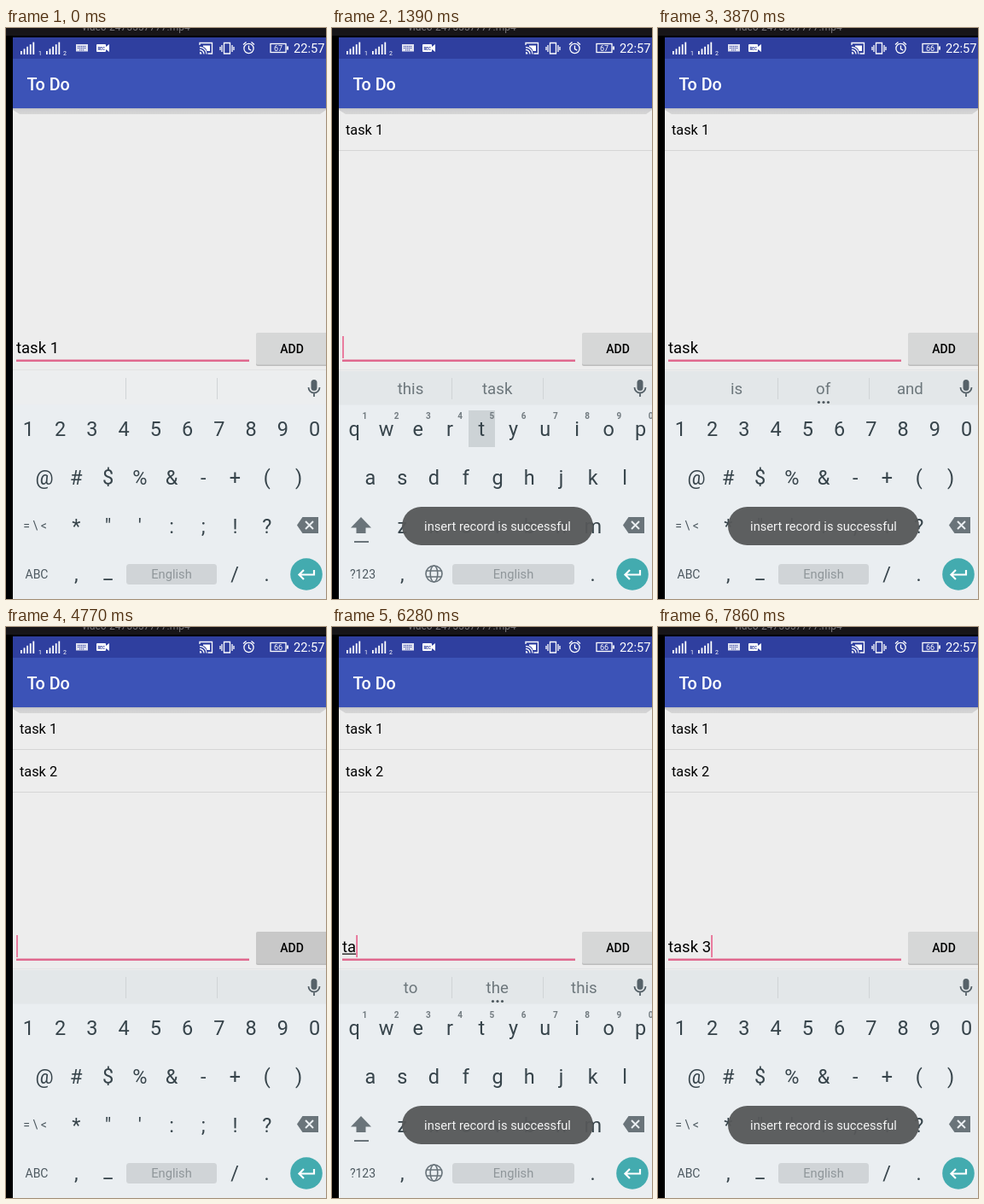
Write an HTML page that moves like this. It is 375 px wide and 669 px high and loops after 8000 ms.

```html
<!DOCTYPE html>
<html lang="en">
<head>
<meta charset="utf-8">
<title>To Do</title>
<style>
  html, body { margin: 0; width: 100%; height: 100%; overflow: hidden; background: #000; }
  svg { display: block; width: 375px; height: 669px; font-family: Roboto, sans-serif; }
  text { white-space: pre; }
  .mid { text-anchor: middle; }
  .key { font-size: 23.5px; fill: #37444b; }
  .mode { font-size: 14px; fill: #4d5960; }
  .hint { font-size: 10px; font-weight: 700; fill: #727b80; }
  .sug { font-size: 18.7px; fill: #6d777c; }
  .item { font-size: 16.3px; }
  .line { fill: none; stroke: #fff; stroke-width: 1.3; }
</style>
</head>
<body>
<svg viewBox="0 0 375 669">
  <defs>
    <linearGradient id="shade" x2="0" y2="1">
      <stop stop-color="#a9abb5"/><stop offset=".35" stop-color="#cfcfd1"/><stop offset="1" stop-color="#d6d6d6"/>
    </linearGradient>
  </defs>
  <rect width="375" height="9" fill="#171518"/>
  <text x="89" y="2.5" font-size="12" fill="#77757a">video-2475557777.mp4</text>
  <rect x="8" y="94" width="367" height="308" fill="#ededed"/>
  <path d="M8 93H375V96L368 101H16L8 96Z" fill="url(#shade)"/>
  <rect x="8" y="36" width="367" height="58" fill="#3c53b7"/>
  <rect x="8" y="11" width="367" height="25" fill="#2f3f9f"/>
  <text x="24.5" y="73" font-size="19.8" font-weight="500" fill="#fff">To Do</text>

  <g id="status" fill="#fff">
    <text x="38" y="32" font-size="7">1</text>
    <text x="67" y="32" font-size="7">2</text>
    <path d="M82 19h14v8.500h-14z" opacity=".85"/>
    <path d="M84 21.500h10M84 23.500h10M86 25.800h6" stroke="#2f3f9f" stroke-dasharray="1.200 .8"/>
    <path d="M107 19h9q1 0 1 1v2l4-3v9l-4-3v2q0 1-1 1h-9q-1 0-1-1v-7q0-1 1-1z"/>
    <text x="107.500" y="25.500" font-size="4.500" font-weight="700" style="fill:#2f3f9f">REC</text>
    <g class="line">
      <path d="M227 20v-2.500h14.500v12.500h-5M227 22.500a8 8 0 0 1 8 8M227 25.500a5 5 0 0 1 5 5"/>
      <path d="M255.500 17.500h7v12.500h-7zM253 20v8M265 20v8M251 22v4M267 22v4"/>
      <circle cx="284.500" cy="24" r="5.600"/>
      <path d="M284.500 20.500v4l2.800 1.600M278 19.500l3.500-3M291 19.500l-3.500-3"/>
      <rect x="310" y="18.500" width="18" height="10"/>
    </g>
    <path d="M231 20.500h8v6.500h-3.500q-1-4-4.500-5zM227 28a2.500 2.500 0 0 1 2.500 2.500H227zM329 21.500h2v4h-2z"/>
    <text id="battery" class="mid" x="319" y="27" font-size="9"></text>
    <text x="337" y="28.500" font-size="14.700">22:57</text>
  </g>

  <g id="list"></g>
  <rect x="12" y="388.500" width="273" height="2.400" fill="#e0648b"/>
  <text id="input" x="12" y="381" font-size="18.500"></text>
  <rect id="under" x="12" y="382.500" height="1.200"/>
  <rect id="cursor" y="361" width="1.600" height="26" fill="#e8608b"/>
  <rect x="293" y="358" width="84" height="38" rx="2" fill="#bcbcbc"/>
  <rect id="add" x="293" y="357" width="84" height="37.500" rx="2"/>
  <text class="mid" x="335" y="381" font-size="14" font-weight="500">ADD</text>

  <rect x="8" y="441" width="367" height="228" fill="#eaeef1"/>
  <rect id="strip" x="8" y="402" width="367" height="39.500"/>
  <path d="M8 400.500H375" stroke="#e1e3e4"/>
  <path d="M140.500 410v25M247.500 410v25" stroke="#d0d4d6"/>
  <g id="sugs"></g>
  <g id="dots" fill="#4d585e"><circle cx="188.500" cy="438.500" r="1.600"/><circle cx="194" cy="438.500" r="1.600"/><circle cx="199.500" cy="438.500" r="1.600"/></g>
  <rect x="357.500" y="412" width="7" height="13" rx="3.500" fill="#566269"/>
  <path d="M354.500 421a6.500 6.500 0 0 0 13 0M361 427.500v4.500" fill="none" stroke="#566269" stroke-width="1.800"/>

  <rect id="press" fill="#cdd3d6"/>
  <g id="abc"></g>
  <g id="sym"></g>
  <path d="M341 582.500l6.500-9.500h18.500v19h-18.500z" fill="#6a747a"/>
  <path d="M351 578l9 9M360 578l-9 9" stroke="#eaeef1" stroke-width="2"/>
  <circle cx="352" cy="640" r="18.800" fill="#43abaf"/>
  <path d="M361 635v5.500h-17M349 635l-5.500 5.500 5.500 5.500" fill="none" stroke="#fff" stroke-width="2.200"/>

  <g id="toast">
    <rect x="82" y="561" width="224" height="45" rx="22.500" fill="#565859" opacity=".95"/>
    <text class="mid" x="194" y="589" font-size="14.700" fill="#f4f4f4">insert record is successful</text>
  </g>
</svg>
<script>
const $ = id => document.getElementById(id);
const LOOP = 8000, STEP = 37.25;
const text = (cls, x, y, s) =>
  `<text class="${cls}" x="${x}" y="${y}">${s.replace('&', '&amp;').replace('<', '&lt;')}</text>`;
const row = (s, x, y, cls = 'mid key') =>
  [...s].map((c, i) => text(cls, x + i * STEP, y, c)).join('');
const space = w => `<rect x="141" y="628" width="${w}" height="24" rx="3.5" fill="#d0d4d7"/>`
  + `<text class="mid" x="${141 + w / 2}" y="645" font-size="14.7" fill="#8f969a">English</text>`;

for (const x of [17, 47])
  for (let i = 0; i < 5; i++)
    $('status').innerHTML += `<rect x="${x + i * 3.6}" y="${27 - i * 2.6}" width="1.8" height="${4 + i * 2.6}"/>`;

$('abc').innerHTML = row('qwertyuiop', 26.3, 478) + row('1234567890', 38.3, 457.5, 'mid hint')
  + row('asdfghjkl', 45, 535) + row('zxcvbnm', 82.3, 592)
  + '<path d="M34 573l12 12.500h-6.500v6.500h-11v-6.500H22zM26 601h17v2H26z" fill="#6a747a"/>'
  + text('mid mode', 36, 645, '?123') + text('mid key', 82.3, 648, ',') + text('mid key', 305.5, 648, '.')
  + space(143)
  + '<g fill="none" stroke="#68737a" stroke-width="1.600"><circle cx="119.500" cy="639.500" r="9.500"/>'
  + '<ellipse cx="119.500" cy="639.500" rx="4.300" ry="9.500"/><path d="M111 636h17M111 643h17"/></g>';

$('sym').innerHTML = row('1234567890', 26.3, 478) + row('@#$%&-+()', 45, 535) + row('*"\':;!?', 82.3, 592)
  + text('mid mode', 34, 588, '= \\ <') + text('mid mode', 36, 645, 'ABC')
  + text('mid key', 82.3, 648, ',') + text('mid key', 119.5, 645, '_')
  + text('mid key', 268, 648, '/') + text('mid key', 305.5, 648, '.') + space(106);

// Highlight boxes: x, y, width, height
const keys = {
  t: [160, 448, 31, 43], a: [30, 505, 31, 43], s: [67, 505, 31, 43], k: [290, 505, 31, 43],
  2: [49, 448, 31, 43], 3: [86, 448, 31, 43], mode: [11, 619, 50, 42], space: [138, 625, 149, 30]
};
const EMPTY = 'this task', T = 'to the this', TA = 'take task talk', TAS = 'taste task tasty',
  TASK = 'talk tasks tasked', NEXT = 'is of and';

// Each step changes only the listed fields.
const steps = [
  [0, { text: 'task 1', cursor: 0, items: 0, abc: 0, sugs: '', battery: 67, toast: 0, press: '', add: 0, plain: 1 }],
  [310, { add: 1 }],
  [430, { items: 1, text: '', cursor: 1 }],
  [580, { add: 0 }],
  [700, { abc: 1, sugs: EMPTY, plain: 0 }],
  [850, { toast: .5 }],
  [970, { toast: .95, cursor: 0 }],
  [1120, { toast: 1 }],
  [1270, { cursor: 1 }],
  [1390, { press: 't' }],
  [1510, { text: 't', battery: 66 }],
  [1630, { press: '', sugs: T }],
  [1780, { press: 'a' }],
  [1900, { text: 'ta' }],
  [2020, { press: '', sugs: TA }],
  [2170, { press: 's' }],
  [2290, { text: 'tas' }],
  [2410, { press: '', sugs: TAS }],
  [2570, { text: 'task', press: 'k' }],
  [2720, { press: '', sugs: TASK }],
  [2840, { press: 'space' }],
  [2960, { text: 'task ', sugs: NEXT }],
  [3080, { press: '' }],
  [3200, { press: 'mode' }],
  [3320, { press: '', abc: 0 }],
  [3870, { cursor: 0 }],
  [3990, { press: '2', cursor: 1 }],
  [4110, { text: 'task 2', sugs: '' }],
  [4260, { press: '', toast: .7 }],
  [4390, { toast: .2 }],
  [4500, { toast: 0 }],
  [4650, { items: 2, text: '', add: 1 }],
  [4930, { add: 0, abc: 1, sugs: EMPTY }],
  [5080, { toast: .5 }],
  [5200, { toast: 1, cursor: 0 }],
  [5480, { cursor: 1 }],
  [6010, { press: 't' }],
  [6130, { press: '', text: 't' }],
  [6280, { text: 'ta', sugs: T }],
  [6400, { sugs: TA }],
  [6560, { text: 'tas' }],
  [6680, { sugs: TAS }],
  [6830, { text: 'task' }],
  [6950, { sugs: TASK }],
  [7070, { press: 'space', text: 'task ' }],
  [7190, { press: '', sugs: NEXT }],
  [7310, { press: 'mode' }],
  [7430, { press: '', abc: 0 }],
  [7590, { cursor: 0 }],
  [7740, { press: '3', cursor: 1 }],
  [7860, { press: '', text: 'task 3', sugs: '' }]
];

const set = (id, attrs) => { for (const k in attrs) $(id).setAttribute(k, attrs[k]); };

function draw(s) {
  $('battery').textContent = s.battery;
  $('input').textContent = s.text;
  const width = s.text ? $('input').getComputedTextLength() : 0;
  set('cursor', { x: 12.2 + width, opacity: s.cursor });
  set('under', { width: s.text.includes(' ') ? 0 : width });
  set('add', { fill: s.add ? '#c8c8c8' : '#d6d7d7' });
  set('strip', { fill: s.plain ? '#eceeef' : '#e3e7e9' });
  set('abc', { visibility: s.abc ? 'visible' : 'hidden' });
  set('sym', { visibility: s.abc ? 'hidden' : 'visible' });
  set('toast', { opacity: s.toast });

  const words = s.sugs.split(' ');
  $('sugs').innerHTML = words.map((w, i) => text('mid sug', 92 + i * 101.7, 429, w)).join('');
  set('dots', { opacity: +(words.length > 2) });

  let list = '';
  for (let i = 0; i < s.items; i++)
    list += text('item', 16, 125 + i * 50, 'task ' + (i + 1))
      + `<rect x="8" y="${143 + i * 50}" width="367" height="1" fill="#d6d6d6"/>`;
  $('list').innerHTML = list;

  const [x, y, w, h] = keys[s.press] || [0, 0, 0, 0];
  set('press', { x, y, width: w, height: h });
}

let shown = -1;
function tick() {
  const t = performance.now() % LOOP;
  const n = steps.filter(([at]) => at <= t).length;
  if (n !== shown) {
    shown = n;
    draw(Object.assign({}, ...steps.slice(0, n).map(([, change]) => change)));
  }
  requestAnimationFrame(tick);
}
tick();
</script>
</body>
</html>
```
